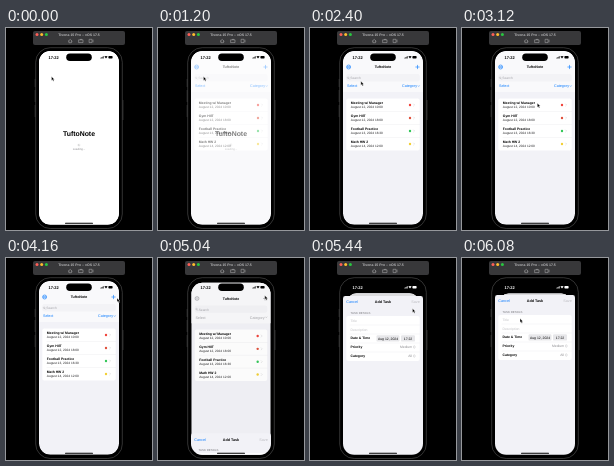
An HTML page that plays this animation: 146x202 px, repeating every 8000 ms.

```html
<!DOCTYPE html>
<html lang="en">
<head>
<meta charset="utf-8">
<title>Task app demo</title>
<style>
html, body { margin: 0; width: 100%; height: 100%; overflow: hidden; background: #000; }
svg { display: block; width: 100vw; height: 100vh; }
text { font-family: "Liberation Sans", Arial, sans-serif; text-rendering: geometricPrecision; }
</style>
</head>
<body>
<svg id="stage" viewBox="0 0 146 202"></svg>
<script>
const LOOP = 8000, STEP = 80, SHEET_TOP = 37, SCREEN_END = 197;

const rect = (x, y, w, h, fill, r = 0, extra = '') =>
  `<rect x="${x}" y="${y}" width="${w}" height="${h}" rx="${r}" fill="${fill}" ${extra}/>`;
const screen = (fill, extra) => rect(33, 23, 80, 173.8, fill, 11.2, extra);
const dot = (x, y, r, fill) => `<circle cx="${x}" cy="${y}" r="${r}" fill="${fill}"/>`;
const line = (d, color, w = 0.5) =>
  `<path d="${d}" fill="none" stroke="${color}" stroke-width="${w}" stroke-linecap="round"/>`;
const label = (x, y, s, size, fill, opt = {}) =>
  `<text x="${x}" y="${y}" font-size="${size}" fill="${fill}" text-anchor="${opt.at || 'start'}"` +
  ` font-weight="${opt.bold ? 700 : 400}">${s}</text>`;

function toolbar() {
  const lights = ['#ff5f57', '#febc2e', '#28c840'].map((c, i) => dot(31 + i * 4.7, 6.6, 1.5, c)).join('');
  return rect(27, 3, 92, 14, '#38383a', 2) + lights +
    label(73, 8, 'Tivona 15 Pro – vOS 17.5', 3.5, '#b8b8ba', { at: 'middle', bold: true }) +
    line('M62.3 13.2L64.2 11.4L66.1 13.2M62.9 13V14.7H65.5V13', '#b4b4b6') +
    line('M73 11.8H77V14.6H73ZM74.3 11.8L74.7 11.2H75.4L75.8 11.8', '#b4b4b6') +
    line('M83.5 11.3H86V14.6H83.5ZM87 12V14', '#b4b4b6');
}

function phone() {
  return rect(28.7, 51, 1, 8, '#333') + rect(28.7, 62, 1, 12, '#333') + rect(28.7, 77, 1, 12, '#333') +
    rect(116.4, 72, 1, 20, '#333') +
    rect(29.7, 19.7, 86.6, 180.8, '#000', 14.5, 'stroke="#484848" stroke-width=".7"');
}

function taskRow([title, date, color], i) {
  const y = 70.5 + i * 13;
  return label(40.8, y + 5.7, title, 3.4, '#000', { bold: true }) +
    label(40.8, y + 9.7, date, 3.2, '#1c1c1e') +
    dot(100, y + 6.5, 1.2, color) +
    line(`M103.6 ${y + 5.5}l1 1l-1 1`, '#c4c4c7', 0.4) +
    (i ? line(`M41 ${y}H109.7`, '#dcdce0', 0.25) : '');
}

function home() {
  const tasks = [
    ['Meeting w/ Manager', 'August 12, 2024 10:00', '#f0443c'],
    ['Gym HIIT', 'August 12, 2024 18:00', '#e0503c'],
    ['Football Practice', 'August 13, 2024 16:30', '#34c759'],
    ['Math HW 2', 'August 14, 2024 12:00', '#f2cf35']
  ];
  return screen('#f2f2f7') + `<path d="M33 64V34.2A11.2 11.2 0 0 1 44.2 23H101.8A11.2 11.2 0 0 1 113 34.2V64Z" fill="#f9f9fb"/>` +
    `<g id="tint" fill="currentColor" stroke="none">` +
      `<circle cx="38.6" cy="39" r="2" fill="none" stroke="currentColor" stroke-width=".6"/>` +
      line('M37.3 38.4H39.9M37.3 39.6H39.9', 'currentColor') +
      line('M105.8 39H109.2M107.5 37.3V40.7', 'currentColor', 0.6) +
      label(37, 59.3, 'Select', 3.7, 'currentColor') +
      label(107, 59.3, 'Category', 3.7, 'currentColor', { at: 'end' }) +
      line('M108 57.7l.7 .8l.7 -.8', 'currentColor', 0.4) +
    `</g>` +
    label(73, 40.4, 'TuftoNote', 3.6, '#000', { at: 'middle', bold: true }) +
    rect(36.3, 46, 73.4, 7.4, '#f3f3f6', 2) +
    line('M38.7 50.4l.8 .8', '#a2a2a8', 0.4) +
    `<circle cx="38.1" cy="49.7" r=".8" fill="none" stroke="#a2a2a8" stroke-width=".35"/>` +
    label(40.3, 51.2, 'Search', 3.3, '#a2a2a8') +
    rect(36.3, 70.5, 73.4, 52, '#fff', 2) + tasks.map(taskRow).join('');
}

function sheet() {
  const rule = y => line(`M40 ${y}H109.7`, '#dcdce0', 0.25);
  const arrows = y => line(`M103.6 ${y - 0.5}l.7 -.8l.7 .8M103.6 ${y + 0.5}l.7 .8l.7 -.8`, '#8a8a8e', 0.35);
  const picker = (name, value, y) => label(40.5, y + 1.2, name, 3.4, '#000', { bold: true }) +
    label(102, y + 1.2, value, 3.4, '#8a8a8e', { at: 'end' }) + arrows(y);
  return rect(33, 0, 80, 180, '#f2f2f7', 2.4) +
    label(36.3, 7.3, 'Cancel', 3.7, '#087aff') +
    label(73, 7.3, 'Add Task', 3.7, '#000', { at: 'middle', bold: true }) +
    label(109.7, 7.3, 'Save', 3.7, '#bcbcc0', { at: 'end' }) +
    label(40.5, 17.5, 'TASK DETAILS', 2.9, '#77777c') +
    rect(36.3, 20, 73.4, 45, '#fff', 2) + [29, 38, 47, 56].map(rule).join('') +
    label(40.5, 25.7, 'Title', 3.4, '#c0c0c4') +
    label(40.5, 34.7, 'Description', 3.4, '#c0c0c4') +
    label(40.5, 43.4, 'Date &amp; Time', 3.4, '#000', { bold: true }) +
    rect(66.5, 39.2, 23, 6.4, '#e7e7ea', 1.2) + rect(91, 39.2, 14, 6.4, '#e7e7ea', 1.2) +
    label(78, 43.5, 'Aug 12, 2024', 3.4, '#000', { at: 'middle' }) +
    label(98, 43.5, '17:22', 3.4, '#000', { at: 'middle' }) +
    picker('Priority', 'Medium', 51) + picker('Category', 'All', 60);
}

function splash() {
  const spokes = Array.from({ length: 8 }, (_, i) =>
    `<path d="M0 -.6V-1.4" stroke="#777" stroke-width=".4" opacity="${0.25 + i * 0.09}" transform="rotate(${i * 45})"/>`);
  return screen('#fff') +
    label(73, 108, 'TuftoNote', 6.9, '#000', { at: 'middle', bold: true }) +
    `<g id="spinner">${spokes.join('')}</g>` +
    label(73, 122.4, 'Loading...', 2.9, '#8a8a8e', { at: 'middle' });
}

function statusBar() {
  return `<g id="status">` +
    label(42.5, 30.7, '17:22', 4, 'currentColor', { bold: true }) +
    [0, 1, 2, 3].map(i => rect(94.5 + i * 0.9, 29.7 - i * 0.5, 0.6, 0.8 + i * 0.5, 'currentColor')).join('') +
    '<path d="M98.4 28.6Q100 27.2 101.6 28.6L100 30.5Z" fill="currentColor"/>' +
    rect(102.4, 28, 4.2, 2.5, 'currentColor', 0.7) +
    `</g>` + rect(60.2, 25.6, 25.6, 7.5, '#000', 3.75);
}

document.getElementById('stage').innerHTML =
  `<defs><clipPath id="screen">${screen('#000')}</clipPath></defs>` +
  rect(0, 0, 146, 202, '#000') + toolbar() + phone() +
  `<g clip-path="url(#screen)">` +
    `<g id="home">${home()}${screen('#000', 'id="dim"')}</g>` +
    `<g id="sheet">${sheet()}</g><g id="splash">${splash()}</g>` +
    statusBar() + rect(59, 194.8, 28, 1, '#000', 0.5) +
  `</g>` +
  '<path id="cursor" d="M0 0V4L1 3.2L1.7 4.8L2.5 4.4L1.8 2.9H3Z" fill="#000" stroke="#fff" stroke-width=".35"/>';

const ui = Object.fromEntries(['home', 'dim', 'tint', 'sheet', 'splash', 'spinner', 'status', 'cursor']
  .map(id => [id, document.getElementById(id)]));

const smooth = k => k * k * (3 - 2 * k);
const clamp = k => Math.min(1, Math.max(0, k));

// keys: [time, ...values], eased between neighbours
function track(keys, t, ease = smooth) {
  const i = keys.findIndex(k => k[0] > t);
  if (i === 0) return keys[0].slice(1);
  if (i < 0) return keys[keys.length - 1].slice(1);
  const a = keys[i - 1], b = keys[i], k = ease((t - a[0]) / (b[0] - a[0]));
  return a.slice(1).map((v, n) => v + (b[n + 1] - v) * k);
}

const pointer = [
  [0, 45.5, 48.5], [2160, 45.5, 48.5], [3040, 74.8, 74.5], [3120, 75.3, 75.2],
  [3520, 75.3, 75.2], [4160, 111, 40], [4320, 107, 38], [4560, 106.8, 37.5],
  [5280, 106.8, 37.5], [5440, 102.5, 50.5], [6080, 58, 60.5]
];
const rise = [
  [4960, 197], [5040, 175.3], [5120, 130], [5200, 83.7], [5280, 50],
  [5360, 50], [5440, 38], [5520, 37.3], [5600, 37]
];

function draw(ms) {
  const t = Math.floor((ms % LOOP) / STEP) * STEP;
  const [top] = track(rise, t, k => k);
  const p = (SCREEN_END - top) / (SCREEN_END - SHEET_TOP);
  const fade = smooth(clamp((t - 880) / 640));

  ui.splash.setAttribute('opacity', 1 - fade);
  ui.spinner.setAttribute('transform', `translate(73 117) rotate(${Math.floor(t / 125) * 45})`);
  ui.home.setAttribute('transform', `translate(73 ${23 + 12.4 * p}) scale(${1 - 0.09 * p}) translate(-73 -23)`);
  ui.dim.setAttribute('opacity', 0.12 * p);
  ui.tint.style.color = p > 0 ? '#a0a0a5' : '#087aff';
  ui.sheet.setAttribute('transform', `translate(0 ${top})`);
  ui.status.style.color = p > 0.8 ? '#fff' : '#000';
  ui.cursor.setAttribute('transform', `translate(${track(pointer, t).join(' ')})`);
}

const start = performance.now();
function tick() {
  draw(performance.now() - start);
  requestAnimationFrame(tick);
}
tick();
</script>
</body>
</html>
```
